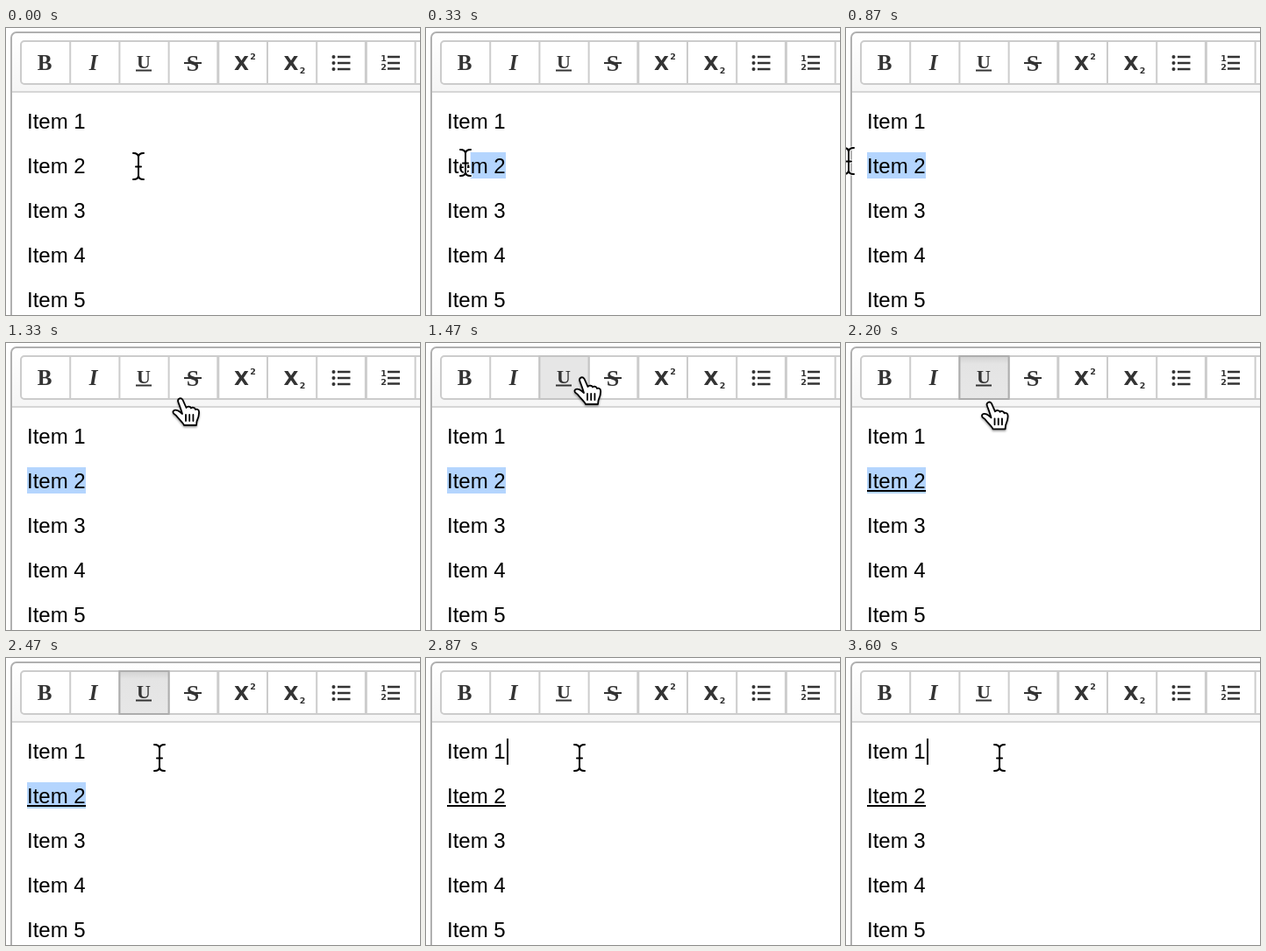
Animation, 472 px wide and 328 px high, one loop 3740 ms. Source, as an HTML page:

```html
<!DOCTYPE html>
<html lang="en">
<head>
<meta charset="utf-8">
<title>Underline in an editor</title>
<style>
  html, body { margin: 0; width: 100%; height: 100%; overflow: hidden; background: #fff; }
  svg { display: block; width: 472px; height: 328px; }
  .item { font: 24px "Liberation Sans", Arial, sans-serif; fill: #000; }
  .icon { font: bold 25px "Liberation Serif", Times, serif; text-anchor: middle; fill: #333; }
  .cross { font: bold 22px "DejaVu Sans", sans-serif; }
  .tiny { font: bold 9.5px "DejaVu Sans", sans-serif; }
  .bars { stroke: #333; stroke-width: 2.6; fill: none; }
  .button { fill: none; stroke: none; stroke-width: 2; }
  .button.hover { fill: #e6e6e6; stroke: #c4c4c4; }
  .button.on { fill: url(#onFill); stroke: #adadad; }
  .button.press { fill: url(#pressFill); stroke: #9c9c9c; }
  .beam { fill: none; stroke-linecap: round; }
</style>
</head>
<body>
<svg viewBox="0 0 472 328">
  <defs>
    <linearGradient id="barFill" x2="0" y2="1">
      <stop stop-color="#fff"/><stop offset="1" stop-color="#f5f5f5"/>
    </linearGradient>
    <linearGradient id="onFill" x2="0" y2="1">
      <stop stop-color="#d2d2d2"/><stop offset=".18" stop-color="#e4e4e4"/><stop offset="1" stop-color="#e7e7e7"/>
    </linearGradient>
    <linearGradient id="pressFill" x2="0" y2="1">
      <stop stop-color="#b4b4b4"/><stop offset=".2" stop-color="#c8c8c8"/><stop offset="1" stop-color="#d4d4d4"/>
    </linearGradient>
    <filter id="shade" x="-50%" y="-50%" width="200%" height="200%">
      <feDropShadow dx="0" dy="1.5" stdDeviation="1.2" flood-opacity=".4"/>
    </filter>
    <path id="beamShape" d="M-6-15C-2-15 0-13 0-10.5C0-13 2-15 6-15M-6 15C-2 15 0 13 0 10.5C0 13 2 15 6 15M0-11V11M-3 .5H3"/>
  </defs>

  <rect x="6" y="5" width="600" height="600" rx="6" fill="#fff"/>
  <path d="M7 73V11Q7 6 12 6H472V73Z" fill="url(#barFill)"/>
  <path d="M7 73H472" stroke="#d6d6d6" stroke-width="2"/>
  <rect x="6" y="5" width="600" height="600" rx="6" fill="none" stroke="#b0b0b0" stroke-width="2"/>

  <rect x="17" y="15" width="600" height="49" rx="4" fill="#fff" stroke="#ccc" stroke-width="2"/>
  <g id="dividers" stroke="#ccc"></g>
  <rect id="button" class="button" y="15" width="56.2" height="49"/>

  <g class="icon">
    <text x="44" y="48">B</text>
    <text x="99.500" y="48" font-style="italic">I</text>
    <text x="157" y="45.500" style="font-size:22px">U</text>
    <path d="M148 48.500H166" class="bars" style="stroke-width:2"/>
    <text x="213" y="48.500" style="font-size:26px">S</text>
    <path d="M203 40H223" class="bars" style="stroke-width:2"/>
    <text x="268.500" y="48" class="cross">X</text>
    <text x="281.500" y="36" class="tiny">2</text>
    <text x="325" y="48" class="cross">X</text>
    <text x="338" y="52" class="tiny">2</text>
    <path d="M378 33H392.500M378 40H392.500M378 47H392.500" class="bars"/>
    <path d="M373.500 33h.01M373.500 40h.01M373.500 47h.01" class="bars" style="stroke-width:4;stroke-linecap:round"/>
    <path d="M435 33H449M435 40H449M435 46.500H449" class="bars"/>
    <text x="430.500" y="37.500" class="tiny">1</text>
    <text x="430.500" y="48" class="tiny">2</text>
  </g>

  <rect id="selection" y="142" height="30" fill="#b4d5fe"/>
  <g id="items" class="item"></g>
  <rect id="underline" x="24" y="168" width="67" height="2"/>
  <rect id="caret" x="92" y="92" width="2" height="30"/>

  <g id="beam" class="beam">
    <use href="#beamShape" stroke="#fff" stroke-width="4"/>
    <use href="#beamShape" stroke="#000" stroke-width="2"/>
  </g>
  <g id="hand" filter="url(#shade)" stroke="#000" stroke-width="1.8" stroke-linejoin="round" stroke-linecap="round">
    <path fill="#fff" d="M-2.600 4.500C-4 1 0-1.500 2.500 2L6.500 11C8 9 11.500 9.500 12 11.500C13.500 9.800 16.500 10.800 17 13C18.500 12 21 13 21 15.500C21.500 20 20 23 18.500 26.500L18 31H4C3 28-2 24-4.500 20.500C-6 18-9 18.500-8.500 15.500C-8 13-4 13-1 15.500L2 18C1 14-1 9-2.600 4.500Z"/>
    <path d="M6 19V26M10.200 19V26M14.400 19V26" fill="none"/>
  </g>
</svg>
<script>
  const $ = id => document.getElementById(id);
  const LOOP = 3740, TICK = 200 / 3, PITCH = 56.2, LEFT = 17;

  for (let i = 1; i <= 8; i++) {
    const x = LEFT + PITCH * i;
    $('dividers').innerHTML += `<path d="M${x} 16V63" stroke-width="${i === 4 || i === 7 ? 3 : 2}"/>`;
  }
  for (let i = 0; i < 5; i++) {
    $('items').innerHTML += `<text x="24" y="${115 + 51 * i}">Item ${i + 1}</text>`;
  }

  // Pointer stops: tick, x, y
  const path = [
    [0, 151, 158], [8, -4, 152], [12, -4, 152], [13, 3, 152], [14, 3, 152],
    [20, 199, 63], [21, 190, 52], [22, 178, 39], [25, 156, 37],
    [30, 156, 37], [37, 175, 114], [56, 175, 114]
  ];
  // Letter edges of the second line
  const edges = [24, 30.7, 37.3, 50.7, 70.7, 77.3, 91];

  const smooth = u => u * u * (3 - 2 * u);
  const show = (el, on) => el.setAttribute('visibility', on ? 'visible' : 'hidden');

  function pointer(n) {
    const i = Math.max(1, path.findIndex(p => p[0] >= n));
    const [n0, x0, y0] = path[i - 1], [n1, x1, y1] = path[i];
    const u = smooth((n - n0) / (n1 - n0));
    return [x0 + (x1 - x0) * u, y0 + (y1 - y0) * u];
  }

  function buttonState(n, index) {
    const over = index === 2;
    if (n >= 26 && n < 42) return over ? 'press' : 'on';
    return index >= 0 ? 'hover' : '';
  }

  function render(t) {
    const n = Math.min(55, Math.floor((t + 4) / TICK));
    const [x, y] = pointer(n);
    const isHand = y < 73;
    show($('hand'), isHand);
    show($('beam'), !isHand);
    $(isHand ? 'hand' : 'beam').setAttribute('transform', `translate(${x.toFixed(1)} ${y.toFixed(1)})`);

    const index = y < 62 ? Math.floor((x - LEFT) / PITCH) : -1;
    const state = buttonState(n, index);
    $('button').setAttribute('class', 'button ' + state);
    $('button').setAttribute('x', LEFT + PITCH * (state === 'hover' ? index : 2));

    const start = n > 8 ? edges[0]
      : edges.reduce((a, b) => Math.abs(b - x) < Math.abs(a - x) ? b : a);
    $('selection').setAttribute('x', start);
    $('selection').setAttribute('width', 91 - start);
    show($('selection'), n < 39);
    show($('underline'), n >= 28);
    show($('caret'), n >= 39 && n < 46 || n >= 54);
  }

  function frame() {
    render(performance.now() % LOOP);
    requestAnimationFrame(frame);
  }
  frame();
</script>
</body>
</html>
```
